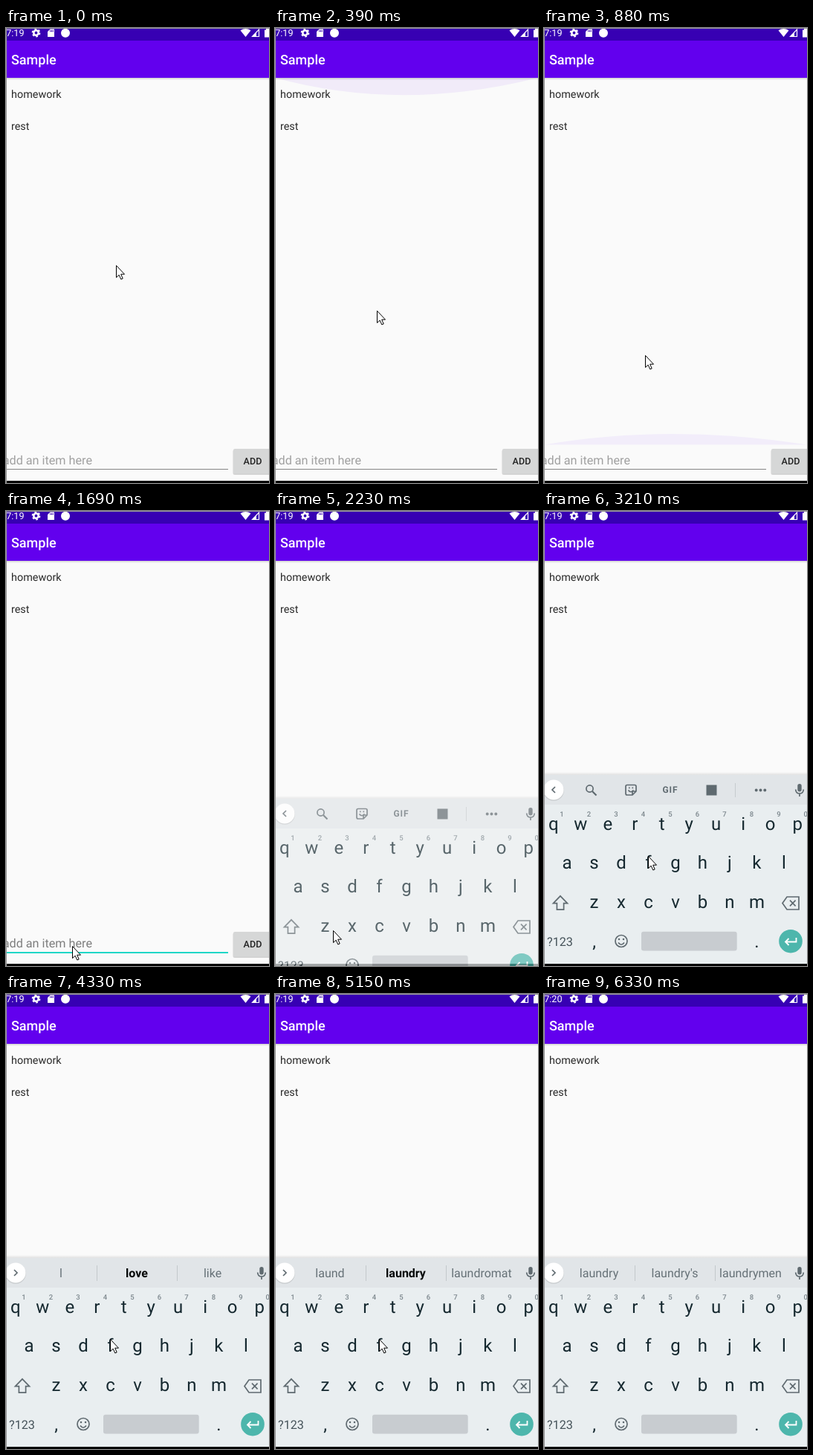
Write an HTML page that moves like this. It is 354 px wide and 612 px high and loops after 8000 ms.

```html
<!DOCTYPE html>
<html lang="en">
<head>
<meta charset="utf-8">
<title>List demo</title>
<style>
html, body { margin: 0; width: 100%; height: 100%; overflow: hidden; background: #fafafa; }
svg { display: block; font-family: Roboto, sans-serif; text-rendering: geometricPrecision; }
.mid { text-anchor: middle; }
.end { text-anchor: end; }
.keys { font-size: 24px; fill: #15282f; }
.digits { font-size: 9.5px; font-weight: 500; fill: #7c878d; }
.icon { fill: none; stroke: #5f6a70; stroke-width: 1.7; }
.solid { fill: #5f6a70; }
.words { font-size: 16px; fill: #667177; }
.words .best { font-weight: 700; fill: #050808; }
</style>
</head>
<body>
<svg width="354" height="612" viewBox="0 0 354 612">
  <defs>
    <linearGradient id="shade" x2="0" y2="1">
      <stop offset="0" stop-color="#000" stop-opacity="0"/>
      <stop offset="1" stop-color="#000" stop-opacity=".1"/>
    </linearGradient>
    <linearGradient id="barShadow" x2="0" y2="1">
      <stop offset="0" stop-color="#000" stop-opacity=".18"/>
      <stop offset="1" stop-color="#000" stop-opacity="0"/>
    </linearGradient>
  </defs>
  <rect width="354" height="612" fill="#fafafa"/>

  <g fill="#6200ee">
    <path id="glowTop"/>
    <path id="glowBottom"/>
  </g>

  <rect y="67" width="354" height="3" fill="url(#barShadow)"/>
  <rect y="17" width="354" height="50" fill="#6200ee"/>
  <rect width="354" height="17" fill="#3700b3"/>
  <text x="7" y="49" font-size="18" font-weight="500" fill="#fff">Sample</text>
  <g font-size="14.4" fill="#2a2a2a">
    <text x="7" y="94.3">homework</text>
    <text x="7" y="137.3">rest</text>
  </g>

  <g fill="#fff">
    <text id="clock" class="end" x="24.5" y="11.3" font-size="12.6"></text>
    <circle cx="40.5" cy="6.5" r="3.2" fill="none" stroke="#fff" stroke-width="2.6"/>
    <circle cx="40.5" cy="6.5" r="5" fill="none" stroke="#fff" stroke-width="1.8" stroke-dasharray="2.6 2.636"/>
    <path d="M59.5 1.5H65V12H56V5Z"/>
    <path d="M59.7 3v2.2M61.5 3v2.2M63.3 3v2.2" stroke="#3700b3"/>
    <circle cx="80" cy="6.7" r="6"/>
    <path d="M315.5 3.3Q322.5-1.2 329.5 3.3L322.5 12Z"/>
    <path d="M331.5 11.5L340.5 2V11.5Z" fill="none" stroke="#fff" stroke-width="1.2"/>
    <path d="M331 12L337 6V12Z"/>
    <path d="M348 2.5H350V1H354V12.5H348Z"/>
  </g>

  <g id="entry">
    <text id="hint" class="end" x="116" y="587" font-size="16.2">add an item here</text>
    <rect id="underline" y="593" width="299"/>
    <rect x="305.5" y="567" width="60" height="34" rx="2.5" opacity=".16"/>
    <rect x="306" y="566" width="60" height="33.5" rx="2" fill="#d6d7d7"/>
    <text class="mid" x="332" y="587" font-size="12.6" font-weight="500" fill="#222">ADD</text>
  </g>
  <rect y="609" width="354" height="3"/>

  <g id="keyboard">
    <rect y="351" width="354" height="4" fill="url(#shade)"/>
    <rect y="355" width="354" height="254" fill="#e9eef0"/>
    <rect y="355" width="354" height="40" fill="#e1e5e8"/>
    <rect y="609" width="354" height="40"/>
    <circle cx="13" cy="376" r="13.8" opacity=".12"/>
    <circle cx="13" cy="375" r="13.5" fill="#fff"/>
    <path id="chevron" class="icon" d="M-2-4L2 0L-2 4"/>

    <g id="tools">
      <g class="icon">
        <circle cx="61.5" cy="373.5" r="4.6"/>
        <path d="M65 377L70.5 382.5" stroke-width="2.2"/>
        <path d="M112 368.5H122Q124 368.5 124 370.5V377L119 382H112Q110 382 110 380V370.5Q110 368.5 112 368.5ZM124 377H119V382"/>
        <path d="M113.5 375.5Q117 380 120.5 375.5M114 372.3h1.6M118.5 372.3h1.6"/>
        <path d="M257.5 366V385" stroke="#c6cbce" stroke-width="1"/>
        <path d="M285.7 375.5h12" stroke-width="4" stroke-linecap="round" stroke-dasharray="0 5.8"/>
      </g>
      <text class="solid" x="159.5" y="379.3" font-size="12" font-weight="700" letter-spacing=".9">GIF</text>
      <rect class="solid" x="218.5" y="368.5" width="14" height="14"/>
    </g>

    <g id="suggestions" class="words mid">
      <path d="M122.5 365V386M230.5 365V386" stroke="#c3c8cb"/>
      <text x="74" y="381.2"></text>
      <text x="176" y="381.2"></text>
      <text x="278" y="381.2"></text>
    </g>

    <rect class="solid" x="341.3" y="367" width="5.4" height="10.5" rx="2.7"/>
    <path class="icon" d="M338.7 374.5Q339 380 344 380T349.3 374.5M344 380V384"/>

    <g id="letters" class="keys mid"></g>
    <g id="digits" class="digits mid"></g>

    <g class="icon">
      <path d="M22 517.8L31.5 527.6H26.6V536.2H17.4V527.6H12.5Z"/>
      <path d="M327 519H343V536H327L321 527.5ZM331 523.7L338.6 531.3M338.6 523.7L331 531.3"/>
      <circle cx="104" cy="578.5" r="8"/>
      <path d="M100 580.5Q104 586 108 580.5"/>
      <path d="M101 576h0M107 576h0" stroke-width="2.6" stroke-linecap="round"/>
    </g>
    <text x="4" y="584.5" font-size="16.2" fill="#46535a">?123</text>
    <rect x="131" y="565.8" width="128.7" height="25.7" rx="3" fill="#c8ccd0"/>
    <circle cx="332" cy="578.7" r="15.8" fill="#4db6ac"/>
    <path d="M339.5 574V579.5H325.5M329.5 575L325 579.5L329.5 584" fill="none" stroke="#fff" stroke-width="1.8"/>
  </g>

  <path d="M0 .5H354M.5 0V612" stroke="#999"/>
  <path id="cursor" d="M.5 .5V16.6L4.2 13.2L6.8 19L9.2 18L6.7 12.2H11.5Z" fill="#fff" stroke="#000"/>
</svg>

<script>
const LOOP = 8000, FOCUS = 1690, KEYBOARD_UP = 2230, TYPING = 4330, WORD_DONE = 5300;
const CURSOR_GONE = 6180, NEXT_MINUTE = 6330;
const KEY_WIDTH = 36.48, ROW_HEIGHT = 52.7;
const $ = id => document.getElementById(id);
const clamp = v => Math.min(1, Math.max(0, v));
const progress = (t, from, to) => clamp((t - from) / (to - from));
const show = (el, on) => el.setAttribute("visibility", on ? "visible" : "hidden");

function set(el, attrs) {
  for (const name in attrs) el.setAttribute(name, attrs[name]);
}

// Pointer turning points: time, x, y. It glides between them.
const pointerPath = [
  [0, 148, 319], [240, 138, 397], [630, 136, 353], [880, 136, 439], [1120, 109, 582],
  [1270, 83, 592], [1540, 89, 585], [FOCUS, 89, 585], [1930, 111, 592], [KEYBOARD_UP, 78, 564],
  [2500, 59, 582], [3210, 140, 464], [5600, 140, 464], [5790, 150, 472], [6060, 153, 579]
];

function pointerAt(t) {
  const next = pointerPath.findIndex(point => point[0] > t);
  if (next < 0) return pointerPath.at(-1).slice(1);
  const [from, to] = [pointerPath[next - 1], pointerPath[next]];
  const k = progress(t, from[0], to[0]);
  return [1, 2].map(i => Math.round(from[i] + (to[i] - from[i]) * k));
}

const guesses = {
  l: ["love", "like"], la: ["last", "later"], lau: ["launch", "late"],
  laund: ["laundry", "laundromat"], laundry: ["laundry's", "laundrymen"]
};

// Three quick letters, a pause, then the rest of the word.
function typedAt(t) {
  const count = t < 5150 ? Math.min(3, 1 + Math.floor((t - TYPING) / 150)) : t < WORD_DONE ? 5 : 7;
  return "laundry".slice(0, count);
}

function addText(parent, x, y, text) {
  const el = document.createElementNS("http://www.w3.org/2000/svg", "text");
  set(el, { x, y });
  el.textContent = text;
  parent.append(el);
}

const addRow = (parent, chars, x, y) =>
  [...chars].forEach((char, i) => addText(parent, x + i * KEY_WIDTH, y, char));

["qwertyuiop", "asdfghjkl", "zxcvbnm"].forEach((chars, row) =>
  addRow($("letters"), chars, 177 - KEY_WIDTH * (chars.length - 1) / 2, 428.6 + ROW_HEIGHT * row));
addText($("letters"), 67.5, 586.5, ",");
addText($("letters"), 286.5, 586.5, ".");
addRow($("digits"), "1234567890", 24, 411);

// Overscroll glow: swells and fades as a curved edge.
function drawGlow(el, edge, height, strength) {
  set(el, {
    d: `M0 ${edge}Q170 ${edge + 2 * height * strength} 354 ${edge}Z`,
    opacity: .06 * strength
  });
}

const swell = (t, from, to) => Math.sin(Math.PI * progress(t, from, to));
const wordSlots = [...$("suggestions").querySelectorAll("text")];

function draw(t) {
  drawGlow($("glowTop"), 67, 24, swell(t, 60, 630));
  drawGlow($("glowBottom"), 560.5, -17, swell(t, 390, 1120));

  const focused = t >= FOCUS;
  set($("hint"), { fill: focused ? "#7d7d7d" : "#a0a0a0" });
  set($("underline"), { height: focused ? 2 : 1, fill: focused ? "#1fd6c6" : "#858585" });

  // The keyboard rises in two visible steps.
  const rise = Math.floor(2 * progress(t, KEYBOARD_UP, 2500)) / 2;
  const open = t >= KEYBOARD_UP;
  show($("entry"), !open);
  set($("keyboard"), {
    transform: `translate(0 ${32 * (1 - rise) ** 2})`,
    opacity: open ? .7 + .3 * rise : 0
  });

  const typing = t >= TYPING;
  show($("tools"), !typing);
  show($("suggestions"), typing);
  set($("chevron"), { transform: `translate(13 375) scale(${typing ? 1 : -1} 1)` });
  if (typing) {
    const typed = typedAt(t);
    [typed, ...guesses[typed]].forEach((word, i) => wordSlots[i].textContent = word);
    wordSlots[1].classList.toggle("best", t < WORD_DONE);
  }

  $("clock").textContent = t < NEXT_MINUTE ? "7:19" : "7:20";
  show($("cursor"), t < CURSOR_GONE);
  set($("cursor"), { transform: `translate(${pointerAt(t).join(" ")})` });
}

const start = performance.now();
function tick() {
  draw((performance.now() - start) % LOOP);
  requestAnimationFrame(tick);
}
tick();
</script>
</body>
</html>
```
